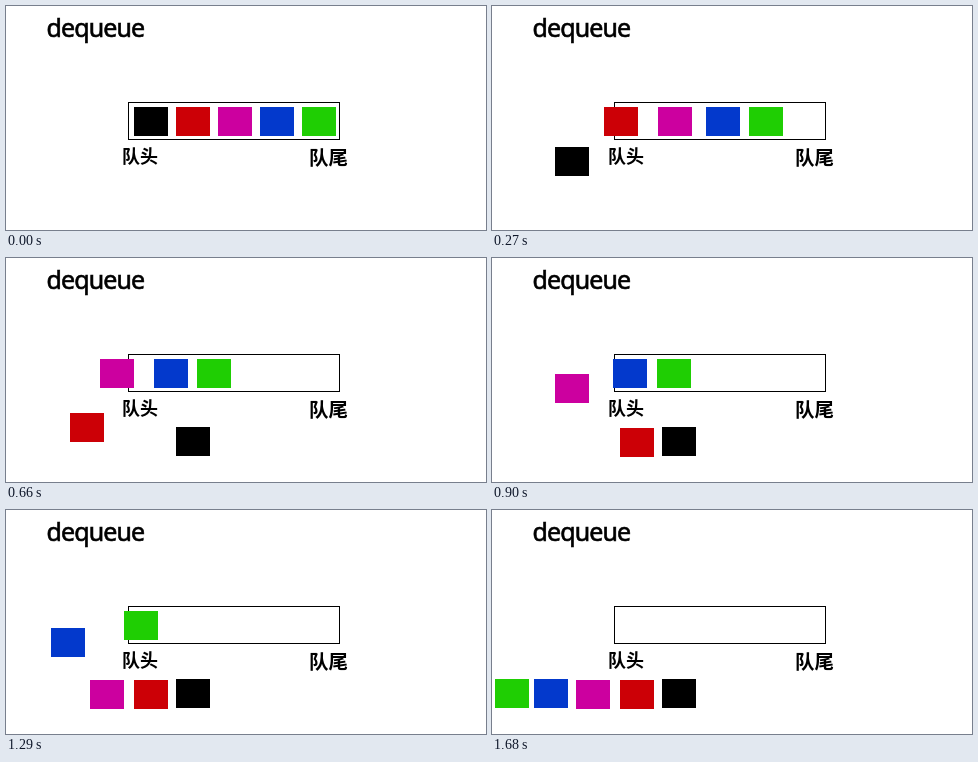
An HTML page that plays this animation: 480x224 px, repeating every 2.31 s.

```html
<!DOCTYPE html>
<html lang="zh">
<head>
<meta charset="utf-8">
<title>dequeue</title>
<style>
  html, body { margin: 0; width: 100%; height: 100%; overflow: hidden; background: #fff; }
  svg { display: block; width: 480px; height: 224px; }
  text { font-family: "Noto Sans CJK SC", "Noto Sans CJK", "Noto Sans", sans-serif; font-weight: 700; }
  .title {
    font-family: "Noto Sans", "Open Sans", sans-serif; font-weight: 400;
    font-size: 25px; letter-spacing: -0.9px; stroke: #000; stroke-width: 0.6px;
  }
</style>
</head>
<body>
<svg viewBox="0 0 480 224">
  <text class="title" x="40.5" y="31">dequeue</text>
  <rect x="122.5" y="96.5" width="211" height="37" fill="none" stroke="#000"/>
  <text x="116" y="157" font-size="18">队头</text>
  <text x="303" y="158.5" font-size="19.5">队尾</text>
  <g id="blocks" shape-rendering="crispEdges"></g>
</svg>
<script>
  const STEP = 30, LOOP = 2310, LAST = 56;
  const HEAD = 128, PITCH = 42, TOP = 101, FLOOR = 169;

  // How far the waiting queue has advanced: [step, distance].
  const advance = [[0, 0], [9, 39.3], [18, 92], [30, 131], [37, 151]];

  // Each block waits until `leave`, then follows its way out: [step, x, y].
  const blocks = [
    { color: '#000', leave: 0, exit: [[5, 90, TOP], [9, 63, 141], [12, 43, FLOOR], [18, 170, FLOOR]] },
    { color: '#cc0006', leave: 9, exit: [[18, 59, TOP], [23, 65, FLOOR], [28, 128, FLOOR + 1]] },
    { color: '#cc009f', leave: 18, exit: [[28, 65, TOP], [37, 56, FLOOR], [42, 84, FLOOR + 1]] },
    { color: '#0339cc', leave: 18, exit: [[30, 121, TOP], [37, 95, TOP], [42, 46, TOP], [46, 42, FLOOR]] },
    { color: '#1fce03', leave: 37, exit: [[46, 105, TOP], [48, 73, TOP], [52, 9, 98], [56, 3, FLOOR]] }
  ];

  // Linear value between keys whose first entry is the step.
  function along(keys, step) {
    const i = keys.findIndex(key => key[0] > step);
    if (i < 0) return keys[keys.length - 1].slice(1);
    const a = keys[i - 1], b = keys[i];
    const p = (step - a[0]) / (b[0] - a[0]);
    return a.slice(1).map((v, k) => v + (b[k + 1] - v) * p);
  }

  // Blocks near the front close up more during the first nine steps.
  function queueX(index, step) {
    const lead = 19 * Math.exp(-((index - 1) ** 2)) * Math.min(1, step / 9);
    return HEAD + PITCH * index - along(advance, step)[0] - lead;
  }

  function position({ leave, exit }, index, step) {
    if (step < leave) return [queueX(index, step), TOP];
    return along([[leave, queueX(index, leave), TOP], ...exit], step);
  }

  const layer = document.getElementById('blocks');
  const rects = blocks.map(({ color }) => {
    const rect = document.createElementNS('http://www.w3.org/2000/svg', 'rect');
    rect.setAttribute('width', 34);
    rect.setAttribute('height', 29);
    rect.setAttribute('fill', color);
    return layer.appendChild(rect);
  });

  function draw(time) {
    const step = Math.min(LAST, Math.floor((time % LOOP) / STEP));
    blocks.forEach((block, i) => {
      const [x, y] = position(block, i, step);
      rects[i].setAttribute('x', Math.round(x));
      rects[i].setAttribute('y', Math.round(y));
    });
  }

  const start = performance.now();
  function tick() {
    draw(performance.now() - start);
    requestAnimationFrame(tick);
  }
  tick();
</script>
</body>
</html>
```
